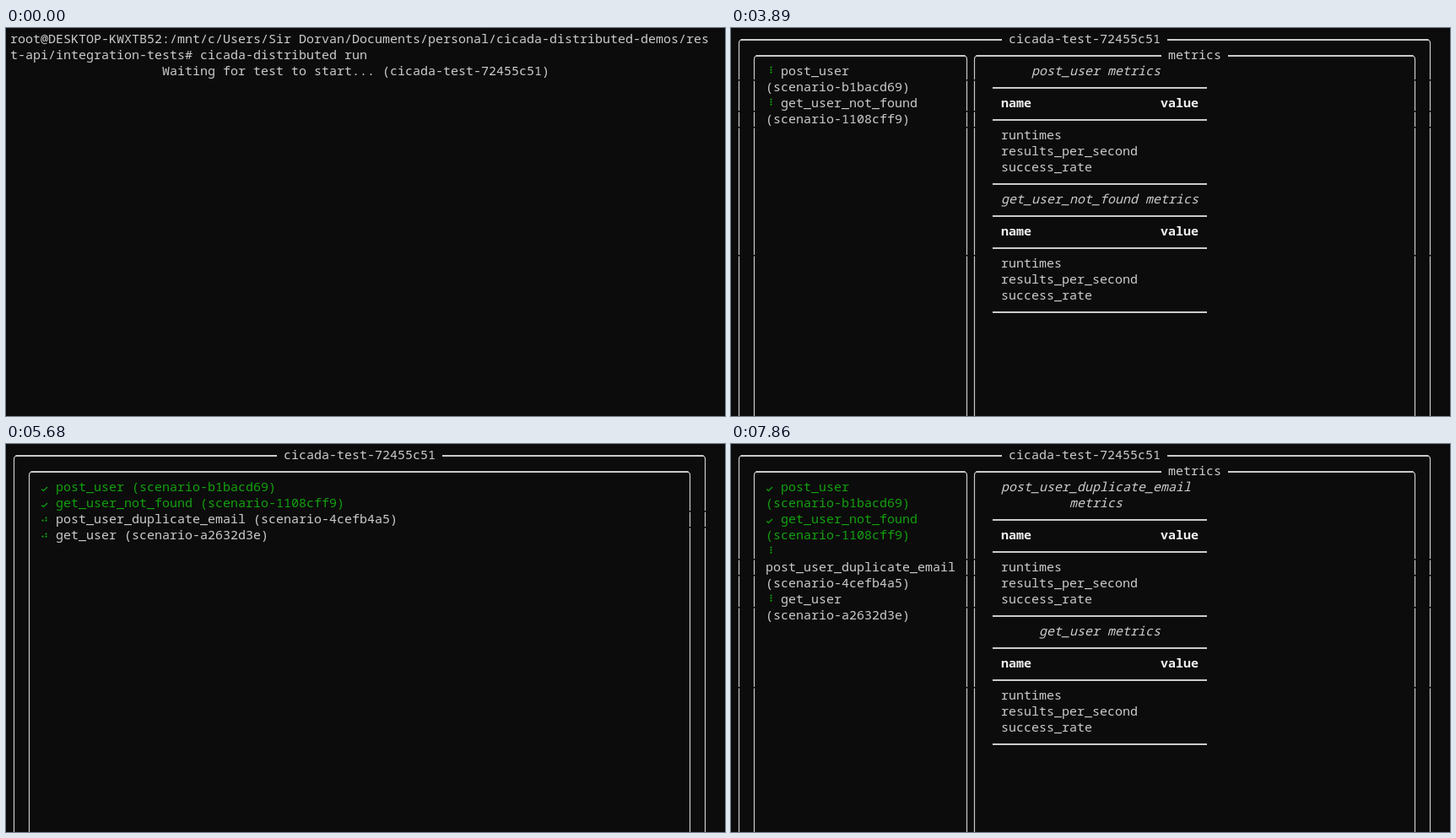
An HTML page for the animation above (8000 ms loop, 852 px wide and 460 px high).

```html
<!DOCTYPE html>
<html lang="en">
<head>
<meta charset="utf-8">
<title>Terminal test run</title>
<style>
  html, body { margin: 0; width: 100%; height: 100%; overflow: hidden; background: #0c0c0c; }
  svg { display: block; }
  text { font: 500 15px "Noto Sans Mono", "DejaVu Sans Mono", monospace; fill: #ccc; white-space: pre; }
  .head { font-weight: 700; fill: #f2f2f2; }
  .title { font-style: italic; }
  .done { fill: #13a10e; }
  .rule { stroke: #ccc; stroke-width: 2; fill: none; }
  .side { stroke: #ccc; stroke-width: 1.2; fill: none; }
  .tick { stroke: #13a10e; stroke-width: 1.3; fill: none; }
  .dots { fill: #13a10e; }
  .gap { fill: #0c0c0c; }
</style>
</head>
<body>
<svg id="stage" width="852" height="460" viewBox="0 0 852 460"></svg>
<script>
const LOOP = 8000, CELL = 9, ROW = 19, W = 852, H = 460;
const NS = "http://www.w3.org/2000/svg";
const DOTS = "⠋⠙⠹⠸⠼⠴⠦⠧⠇⠏";
const stage = document.getElementById("stage");
const spinners = [];

function add(parent, tag, attrs, content) {
  const el = document.createElementNS(NS, tag);
  for (const key in attrs) el.setAttribute(key, attrs[key]);
  if (content) el.textContent = content;
  parent.appendChild(el);
  return el;
}

const left = col => 5 + col * CELL;
const mid = col => left(col) + CELL / 2;
const ruleY = row => 14 + row * ROW;

function write(g, row, col, str, cls = "") {
  add(g, "text", { x: left(col), y: 18 + row * ROW, class: cls }, str);
}

function rule(g, y, x1, x2) {
  add(g, "path", { d: `M${x1} ${y}H${x2}`, class: "rule" });
}

// Panel with rounded top corners, running off the bottom of the screen
function panel(g, row, c1, c2, title, col) {
  const x1 = mid(c1), x2 = mid(c2), y = ruleY(row), r = 4;
  add(g, "path", { d: `M${x1} ${H}V${y + r}Q${x1} ${y} ${x1 + r} ${y}`, class: "side" });
  add(g, "path", { d: `M${x2} ${H}V${y + r}Q${x2} ${y} ${x2 - r} ${y}`, class: "side" });
  if (!title) return rule(g, y, x1 + 2, x2 - 2);
  rule(g, y, x1 + 2, left(col) - 8);
  rule(g, y, left(col + title.length) + 8, x2 - 2);
  write(g, row, col, title);
}

function tick(g, row) {
  const y = row * ROW;
  add(g, "path", { d: `M42 ${y + 15.5}L44.5 ${y + 17.5}L49 ${y + 13}`, class: "tick" });
}

// Six dots in the bit order of a braille character
function spinner(g, row) {
  const box = add(g, "g", { class: "dots" });
  spinners.push(box);
  for (let i = 0; i < 6; i++) {
    const cx = 43.5 + 4 * Math.floor(i / 3), cy = row * ROW + 8.5 + 3.1 * (i % 3);
    add(box, "circle", { cx, cy, r: 1.1 });
  }
}

function table(g, row, titles) {
  titles.forEach(([col, str], i) => write(g, row + i, col, str, "title"));
  const top = row + titles.length;
  [0, 2, 6].forEach(n => rule(g, ruleY(top + n), 310, 564));
  write(g, top + 1, 35, "name", "head");
  write(g, top + 1, 56, "value", "head");
  ["runtimes", "results_per_second", "success_rate"]
    .forEach((str, i) => write(g, top + 3 + i, 35, str));
}

function gaps(g, ys, cols) {
  for (const y of ys) for (const c of cols)
    add(g, "rect", { x: mid(c) - 3, y: y - 1, width: 6, height: 1.6, class: "gap" });
}

function scene(build) {
  const g = add(stage, "g", {});
  build(g);
  return g;
}

function outer(g) {
  panel(g, 0, 0, 91, "cicada-test-72455c51", 36);
}

function split(g, breaks) {
  outer(g);
  panel(g, 1, 2, 30);
  panel(g, 1, 31, 89, "metrics", 57);
  gaps(g, breaks, [0, 2, 30, 31, 89, 91]);
}

add(stage, "rect", { width: W, height: H, fill: "#0c0c0c" });

const waiting = scene(g => {
  write(g, 0, 0, "root@DESKTOP-KWXTB52:/mnt/c/Users/Sir Dorvan/Documents/personal/cicada-distributed-demos/res");
  write(g, 1, 0, "t-api/integration-tests# cicada-distributed run");
  write(g, 2, 20, "Waiting for test to start... (cicada-test-72455c51)");
});

const first = scene(g => {
  split(g, [62, 99, 118, 270]);
  spinner(g, 2);
  write(g, 2, 6, "post_user");
  write(g, 3, 4, "(scenario-b1bacd69)");
  spinner(g, 4);
  write(g, 4, 6, "get_user_not_found");
  write(g, 5, 4, "(scenario-1108cff9)");
  table(g, 2, [[39, "post_user metrics"]]);
  table(g, 10, [[35, "get_user_not_found metrics"]]);
});

const listing = scene(g => {
  outer(g);
  panel(g, 1, 2, 89);
  gaps(g, [80, 99], [89, 91]);
  tick(g, 2);
  write(g, 2, 6, "post_user (scenario-b1bacd69)", "done");
  tick(g, 3);
  write(g, 3, 6, "get_user_not_found (scenario-1108cff9)", "done");
  spinner(g, 4);
  write(g, 4, 6, "post_user_duplicate_email (scenario-4cefb4a5)");
  spinner(g, 5);
  write(g, 5, 6, "get_user (scenario-a2632d3e)");
});

const second = scene(g => {
  split(g, [137, 156, 194, 289]);
  tick(g, 2);
  write(g, 2, 6, "post_user", "done");
  write(g, 3, 4, "(scenario-b1bacd69)", "done");
  tick(g, 4);
  write(g, 4, 6, "get_user_not_found", "done");
  write(g, 5, 4, "(scenario-1108cff9)", "done");
  spinner(g, 6);
  write(g, 7, 4, "post_user_duplicate_email");
  write(g, 8, 4, "(scenario-4cefb4a5)");
  spinner(g, 9);
  write(g, 9, 6, "get_user");
  write(g, 10, 4, "(scenario-a2632d3e)");
  table(g, 2, [[35, "post_user_duplicate_email"], [44, "metrics"]]);
  table(g, 11, [[40, "get_user metrics"]]);
});

// The last row is blank for a moment after a redraw
const blank = add(stage, "rect", { y: 440, width: W, height: 20, fill: "#0c0c0c" });

const scenes = [[0, waiting], [1250, first], [5220, listing], [6140, second]];
const redraws = [2450, 3700, 5220];
const holds = [[5950, 6140], [7000, 7200]];

const show = (el, on) => el.setAttribute("visibility", on ? "visible" : "hidden");

function render(t) {
  scenes.forEach(([start, g], i) => {
    const end = i + 1 < scenes.length ? scenes[i + 1][0] : LOOP;
    g.setAttribute("display", t >= start && t < end ? "inline" : "none");
  });
  show(blank, redraws.some(r => t >= r && t < r + 65));

  const hold = holds.find(([a, b]) => t >= a && t < b);
  const step = Math.floor(((hold ? hold[0] : t) - 405 + LOOP) / 80) % DOTS.length;
  const bits = DOTS.charCodeAt(step) - 0x2800;
  for (const box of spinners) {
    box.setAttribute("opacity", t < 1315 ? 0.25 : 1);
    [...box.children].forEach((dot, i) => dot.setAttribute("display", bits >> i & 1 ? "inline" : "none"));
  }
}

function loop() {
  render(performance.now() % LOOP);
  requestAnimationFrame(loop);
}
loop();
</script>
</body>
</html>
```
